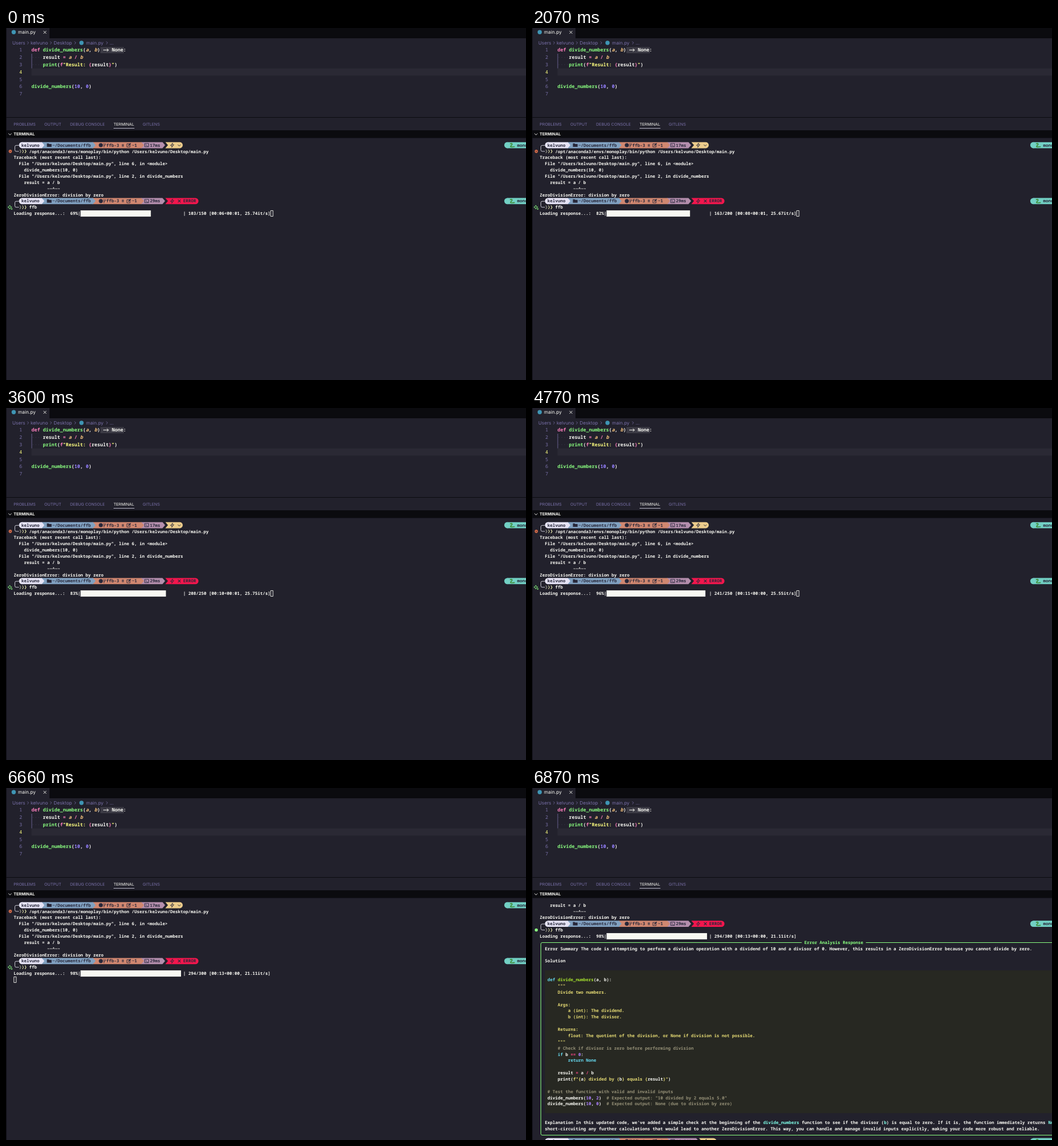
Write an HTML page with a canvas that moves like this. It is 909 by 616 pixels and loops after 8460 ms.

```html
<!DOCTYPE html>
<html lang="en">
<head>
<meta charset="utf-8">
<title>Terminal session</title>
<style>
html, body { margin: 0; width: 100%; height: 100%; overflow: hidden; background: #22212c; }
canvas { display: block; width: 909px; height: 616px; }
</style>
</head>
<body>
<canvas id="stage"></canvas>
<script>
const W = 909, H = 616, LOOP = 8460;
const canvas = document.getElementById('stage');
const dpr = window.devicePixelRatio || 1;
canvas.width = W * dpr;
canvas.height = H * dpr;
const ctx = canvas.getContext('2d');
ctx.scale(dpr, dpr);
ctx.textRendering = 'geometricPrecision';

const BG = '#22212c', BLACK = '#0b0b0f', FG = '#f8f8f2', MUTED = '#7970a9';
const GREEN = '#8aff80', PINK = '#ff80bf', ORANGE = '#ffca80', PURPLE = '#9580ff';
const YELLOW = '#ffff80', CYAN = '#80ffea';
// code block palette
const KEY = '#66d9ef', NAME = '#a6e22e', STR = '#e6db74', NOTE = '#959077', OP = '#ff4689', NUM = '#ae81ff';
const MONO = '"Noto Sans Mono", "DejaVu Sans Mono", monospace';
const SANS = 'Inter, "Open Sans", sans-serif';
const USER = 'kelvuno';

const CELL = 4.489, ROW = 10.87, LEFT = 13.6, TOP = 205;
const col = c => LEFT + CELL * c;
const crisp = v => Math.floor(v) + 0.5;

function rect(x, y, w, h, color) {
  ctx.fillStyle = color;
  ctx.fillRect(x, y, w, h);
}
function disc(x, y, r, color) {
  ctx.fillStyle = color;
  ctx.beginPath();
  ctx.arc(x, y, r, 0, 7);
  ctx.fill();
}
function line(color, width, ...pts) {
  ctx.strokeStyle = color;
  ctx.lineWidth = width;
  ctx.beginPath();
  for (let i = 0; i < pts.length; i += 2) ctx.lineTo(pts[i], pts[i + 1]);
  ctx.stroke();
}
function poly(color, ...pts) {
  ctx.fillStyle = color;
  ctx.beginPath();
  for (let i = 0; i < pts.length; i += 2) ctx.lineTo(pts[i], pts[i + 1]);
  ctx.fill();
}
function label(text, x, mid, size, color, weight = 400) {
  ctx.font = `${weight} ${size}px ${SANS}`;
  ctx.fillStyle = color;
  ctx.fillText(text, x, mid + size * 0.36);
}
// spans alternate colour and text; '*' makes bold, '/' italic
function mono(x, mid, cell, weight, spans) {
  for (let i = 0; i < spans.length; i += 2) {
    const [color, mark] = spans[i].split(' ');
    const style = mark === '/' ? 'italic ' : '';
    ctx.font = `${style}${mark === '*' ? 800 : weight} ${cell / 0.6}px ${MONO}`;
    ctx.fillStyle = color;
    ctx.fillText(spans[i + 1], x, mid + cell * 0.59);
    x += cell * spans[i + 1].length;
  }
}
const term = (c, y, ...spans) => mono(col(c), y, CELL, 600, spans);

function drawEditor() {
  rect(0, 0, W, H, BG);
  rect(76, 0, W - 76, 18, BLACK);
  disc(13.5, 7.3, 3.7, '#3f95b4');
  label('main.py', 21, 7.4, 8.3, FG);
  line(FG, 0.9, 65.5, 5, 70.5, 10);
  line(FG, 0.9, 70.5, 5, 65.5, 10);

  const crumbs = [['Users', 11], [USER, 43], ['Desktop', 83.3], ['main.py', 140], ['...', 181]];
  for (const [text, x] of crumbs) label(text, x, 26, 8.2, MUTED);
  for (const x of [38.5, 78.5, 121, 176.5]) line(MUTED, 0.8, x - 1.3, 23.6, x + 1.1, 26, x - 1.3, 28.4);
  disc(132, 26, 3.7, '#3f95b4');

  rect(44.5, 70.6, W, 12.8, '#2a2934');
  rect(44.6, 45, 0.8, 25.6, MUTED);
  const lineY = n => 38.5 + 12.8 * (n - 1);
  for (let n = 1; n < 8; n++) mono(23.2, lineY(n), 5, 400, [n === 4 ? YELLOW : MUTED, String(n)]);
  for (const n of [2, 3])
    for (let i = 0; i < 4; i++) rect(46.7 + 5 * i, lineY(n) - 0.4, 0.8, 0.8, '#504c68');

  const code = (n, c, ...spans) => mono(44.5 + 5 * c, lineY(n), 5, 600, spans);
  rect(165, 33.3, 41, 10.8, '#3c3b45');
  code(1, 0, PINK, 'def ', GREEN, 'divide_numbers', FG, '(', ORANGE + ' /', 'a', FG, ', ', ORANGE + ' /', 'b', FG, ')');
  line(FG, 1, 170, 38.6, 179, 38.6);
  line(FG, 1, 176.4, 36.2, 179.2, 38.6, 176.4, 41);
  code(1, 28.1, FG, 'None:');
  code(2, 4, FG, 'result ', PINK, '= ', ORANGE + ' /', 'a', PINK, ' / ', ORANGE + ' /', 'b');
  code(3, 4, GREEN, 'print', FG, '(', PINK, 'f', YELLOW, '"Result: ', PINK, '{', FG, 'result', PINK, '}', YELLOW, '"', FG, ')');
  code(6, 0, GREEN, 'divide_numbers', FG, '(', PURPLE, '10', FG, ', ', PURPLE, '0', FG, ')');

  rect(0, 156, W, 1, BLACK);
  const tabs = [['PROBLEMS', 13.3], ['OUTPUT', 67], ['DEBUG CONSOLE', 112], ['TERMINAL', 188], ['GITLENS', 239]];
  for (const [text, x] of tabs) label(text, x, 168.3, 7.1, text === 'TERMINAL' ? FG : MUTED);
  rect(188, 175, 36.5, 0.9, '#c9c7d6');
  rect(0, 179, W, 13.5, BLACK);
  line(FG, 0.9, 4.3, 184.6, 7, 187.2, 9.7, 184.6);
  label('TERMINAL', 13.3, 185.7, 7.1, FG, 700);
  rect(0, 0, 0.8, H, BLACK);
}

function arrow(x0, x1, y, color) {
  poly(color, x0, y - 5.4, x1, y - 5.4, x1 + 4.6, y, x1, y + 5.4, x0, y + 5.4);
}
function bolt(x, y, color) {
  ctx.lineJoin = 'round';
  line(color, 0.9, x + 0.8, y - 3.6, x - 3, y + 0.7, x - 0.2, y + 0.7, x - 0.8, y + 3.8, x + 3, y - 0.8, x + 0.2, y - 0.8, x + 0.8, y - 3.6);
}

function drawPrompt(y, time, ok) {
  const dx = (time.length - 4) * CELL;
  const ink = '#28283a';
  const hue = ok ? '#ebcb8b' : '#f3164d';
  const end = (ok ? 309 : 336.5) + dx, s = 278.5 + dx;

  // status segment
  ctx.fillStyle = hue;
  ctx.beginPath();
  ctx.moveTo(s, y - 5.4);
  ctx.lineTo(end - 5.4, y - 5.4);
  ctx.arc(end - 5.4, y, 5.4, -Math.PI / 2, Math.PI / 2);
  ctx.lineTo(s, y + 5.4);
  ctx.lineTo(s + 4.6, y);
  ctx.fill();
  bolt(290.5 + dx, y, ink);
  if (ok) line(ink, 1, 300.4 + dx, y - 0.8, 302.8 + dx, y + 1.6, 305.2 + dx, y - 0.8);
  else {
    line(ink, 1.1, 300.6, y - 2.4, 305.4, y + 2.4);
    line(ink, 1.1, 305.4, y - 2.4, 300.6, y + 2.4);
    term(66, y, ink, 'ERROR');
  }

  arrow(236, 273.5 + dx, y, '#b48ead');
  arrow(151, 236.5, y, '#d08770');
  arrow(62, 152, y, '#81a1c1');
  disc(28, y, 5.4, '#e5e3f5');
  arrow(28, 62.5, y, '#e5e3f5');
  term(3, y, ink, USER);

  // directory
  poly(ink, 71.5, y - 3, 74.5, y - 3, 75.5, y - 2, 79.7, y - 2, 79.7, y + 3, 71.5, y + 3);
  term(15, y, ink, '~/Documents/ffb');

  // repository
  disc(165.8, y, 3.6, ink);
  line(ink, 0.9, 171.3, y - 3.5, 171.3, y + 3.7);
  line(ink, 0.9, 174, y - 3.2, 174, y - 0.8, 171.3, y + 1.2);
  term(36, y, ink, 'ffb-3 ≡');
  ctx.strokeStyle = ink;
  ctx.lineWidth = 0.9;
  ctx.strokeRect(211.3, y - 2.4, 5.6, 5.6);
  line(ink, 1.5, 213.8, y + 0.9, 218, y - 3.2);
  term(46, y, ink, '~1');

  // duration
  ctx.lineWidth = 0.9;
  ctx.strokeRect(242.4, y - 2.9, 7, 5.8);
  line(ink, 0.8, 244, y - 1.3, 245.6, y + 0.1, 244, y + 1.5);
  line(ink, 0.8, 246, y + 1.6, 248, y + 1.6);
  term(53, y, ink, time);

  // environment
  disc(876.4, y, 5.4, '#72d0c4');
  rect(876.4, y - 5.4, 33, 10.8, '#72d0c4');
  ctx.strokeStyle = '#3f8f3a';
  ctx.lineWidth = 1.7;
  ctx.beginPath();
  ctx.moveTo(881, y - 2.2);
  ctx.bezierCurveTo(886, y - 4.6, 885.5, y - 0.5, 882.3, y + 1.4);
  ctx.bezierCurveTo(880.5, y + 4, 886, y + 3.2, 889.3, y + 2.5);
  ctx.stroke();
  term(196, y, ink, 'monoplay');

  // bracket and chevrons on the second line
  const x = crisp(col(0.5)), low = y + ROW;
  ctx.strokeStyle = '#d9d8e2';
  ctx.lineWidth = 0.9;
  ctx.beginPath();
  ctx.moveTo(22.6, y + 0.4);
  ctx.arcTo(x, y + 0.4, x, low, 2.4);
  ctx.arcTo(x, low, 22.6, low, 2.4);
  ctx.lineTo(22.6, low);
  ctx.stroke();
  ['#9a9b8c', '#c9cb9c', '#f1f3b2'].forEach((c, i) => {
    const cx = col(2.35 + i);
    line(c, 1.1, cx, low - 3.2, cx + 1.9, low, cx, low + 3.2);
  });
}

function drawGutter(y, kind) {
  if (kind === 'fail') {
    disc(7.5, y, 2.8, '#e0704a');
    line(BG, 0.7, 6.4, y - 1.1, 8.6, y + 1.1);
    line(BG, 0.7, 8.6, y - 1.1, 6.4, y + 1.1);
  } else if (kind === 'done') disc(7.5, y, 2.7, GREEN);
  else {
    ctx.lineJoin = 'round';
    line(GREEN, 0.9, 6.6, y - 3.6, 7.7, y - 1.2, 10.2, y - 0.2, 7.7, y + 0.9, 6.6, y + 3.2, 5.5, y + 0.9, 3.2, y - 0.2, 5.5, y - 1.2, 6.6, y - 3.6);
    line(GREEN, 0.9, 10, y + 1.6, 10, y + 4.4);
    line(GREEN, 0.9, 8.6, y + 3, 11.4, y + 3);
  }
}

// [time, updates so far]; updates are evenly spread between these points
const PACE = [[30, 1], [780, 8], [900, 9], [1110, 11], [1200, 12], [1920, 19], [2070, 20], [2880, 28],
  [3000, 29], [3600, 35], [3720, 36], [3840, 37], [3930, 38], [4770, 46], [4890, 47], [5730, 55],
  [5820, 56], [5940, 57], [6540, 63]];
const SPEED = [[0, 25.74], [1110, 25.72], [2070, 25.67], [3600, 25.75], [5820, 25.38], [6600, 25.41]];
const CLOSE = 6660, PRINT = 6690, PROMPT = 6810, DONE = 6840;

function lerp(keys, x) {
  let i = 1;
  while (i < keys.length - 1 && x > keys[i][0]) i++;
  const [x0, y0] = keys[i - 1], [x1, y1] = keys[i];
  return y0 + (y1 - y0) * Math.min(1, (x - x0) / (x1 - x0));
}
const byCount = PACE.map(([t, n]) => [n, t]);
const ticks = [0];
for (let n = 1; n <= 63; n++) ticks.push(Math.round(lerp(byCount, n) / 30) * 30);

function drawProgress(y, t) {
  const closed = t >= CLOSE;
  let k = 0;
  while (k < 63 && ticks[k + 1] <= t) k++;
  const n = closed ? 294 : 103 + 3 * k;
  const total = Math.max(150, Math.ceil(n / 50) * 50);
  const rate = closed ? 21.11 : lerp(SPEED, ticks[k]);
  const clock = s => '00:' + String(Math.floor(s)).padStart(2, '0');
  const spent = clock(6.62 + 0.0011 * (closed ? CLOSE : ticks[k]));
  const left = clock((total - n) / rate);
  const percent = String(Math.round(100 * n / total)).padStart(3);
  term(0, y, FG, `Loading response...: ${percent}%|`);
  rect(col(26), y - 5.4, Math.floor(320 * n / total) / 8 * CELL, 10.9, FG);
  term(66, y, FG, `| ${n}/${total} [${spent}<${left}, ${rate.toFixed(2)}it/s]`);

  if (t < PRINT) {
    ctx.strokeStyle = FG;
    ctx.lineWidth = 0.9;
    ctx.strokeRect(col(closed ? 0 : 100) + 0.2, y - 5 + (closed ? ROW : 0), 4.1, 10);
  }
}

function drawReport(at) {
  const bold = FG + ' *', cyan = CYAN + ' *';
  const row = (r, c, ...spans) => term(c, at(r), ...spans);
  const x = crisp(col(0.5)), y0 = crisp(at(12)), y1 = crisp(at(43));

  rect(col(2), at(17) - ROW / 2, W, ROW * 23, '#272822');
  ctx.strokeStyle = GREEN;
  ctx.lineWidth = 1;
  ctx.beginPath();
  ctx.moveTo(col(102), y0);
  ctx.arcTo(x, y0, x, y1, 2.4);
  ctx.arcTo(x, y1, W, y1, 2.4);
  ctx.lineTo(W, y1);
  ctx.moveTo(col(127), y0);
  ctx.lineTo(W, y0);
  ctx.stroke();
  row(12, 103, GREEN, 'Error Analysis Response');

  row(13, 2, bold, 'Error Summary', FG, ' The code is attempting to perform a division operation with a dividend of 10 and a divisor of 0. However, this results in a ZeroDivisionError because you cannot divide by zero.');
  row(15, 2, bold, 'Solution');

  row(18, 3, KEY, 'def ', NAME, 'divide_numbers', FG, '(a, b):');
  const doc = ['"""', 'Divide two numbers.', '', 'Args:', '    a (int): The dividend.', '    b (int): The divisor.', '',
    'Returns:', '    float: The quotient of the division, or None if division is not possible.', '"""'];
  doc.forEach((text, i) => row(19 + i, 7, STR, text));
  row(29, 7, NOTE, '# Check if divisor is zero before performing division');
  row(30, 7, KEY, 'if ', FG, 'b ', OP, '== ', NUM, '0', FG, ':');
  row(31, 11, KEY, 'return None');
  row(33, 7, FG, 'result ', OP, '= ', FG, 'a ', OP, '/ ', FG, 'b');
  row(34, 7, FG, 'print(', STR, 'f"{', FG, 'a', STR, '} divided by {', FG, 'b', STR, '} equals {', FG, 'result', STR, '}"', FG, ')');
  row(36, 3, NOTE, '# Test the function with valid and invalid inputs');
  const call = (r, arg, note) =>
    row(r, 3, FG, 'divide_numbers(', NUM, '10', FG, ', ', NUM, arg, FG, ')  ', NOTE, '# Expected output: ' + note);
  call(37, '2', '"10 divided by 2 equals 5.0"');
  call(38, '0', 'None (due to division by zero)');

  row(41, 2, bold, 'Explanation', FG, " In this updated code, we've added a simple check at the beginning of the ", cyan, 'divide_numbers',
    FG, ' function to see if the divisor (', cyan, 'b', FG, ') is equal to zero. If it is, the function immediately returns ', cyan, 'None', FG, ',');
  row(42, 2, FG, 'short-circuiting any further calculations that would lead to another ZeroDivisionError. This way, you can handle and manage invalid inputs explicitly, making your code more robust and reliable.');
}

function drawTerminal(t) {
  const scroll = t < PRINT ? 0 : t < PROMPT ? 5 : 6;
  const at = r => TOP + ROW * (r - scroll);
  const row = (r, c, text) => term(c, at(r), FG, text);
  const file = `  File "/Users/${USER}/Desktop/main.py", line `;

  ctx.save();
  ctx.beginPath();
  ctx.rect(0, TOP - ROW / 2, W, H);
  ctx.clip();
  drawPrompt(at(0), '17ms', true);
  drawGutter(at(1), 'fail');
  row(1, 6, `/opt/anaconda3/envs/monoplay/bin/python /Users/${USER}/Desktop/main.py`);
  row(2, 0, 'Traceback (most recent call last):');
  row(3, 0, file + '6, in <module>');
  row(4, 4, 'divide_numbers(10, 0)');
  row(5, 0, file + '2, in divide_numbers');
  row(6, 4, 'result = a / b');
  row(7, 13, '~~^~~');
  row(8, 0, 'ZeroDivisionError: division by zero');
  drawPrompt(at(9), '29ms', false);
  drawGutter(at(10), t < DONE ? 'run' : 'done');
  row(10, 6, 'ffb');
  drawProgress(at(11), t);
  if (t >= PRINT) drawReport(at);
  if (t >= PROMPT) drawPrompt(at(44), '16.241s', true);
  ctx.restore();
}

const start = performance.now();
function frame() {
  const t = (performance.now() - start) % LOOP;
  drawEditor();
  drawTerminal(t);
  requestAnimationFrame(frame);
}
frame();
</script>
</body>
</html>
```
